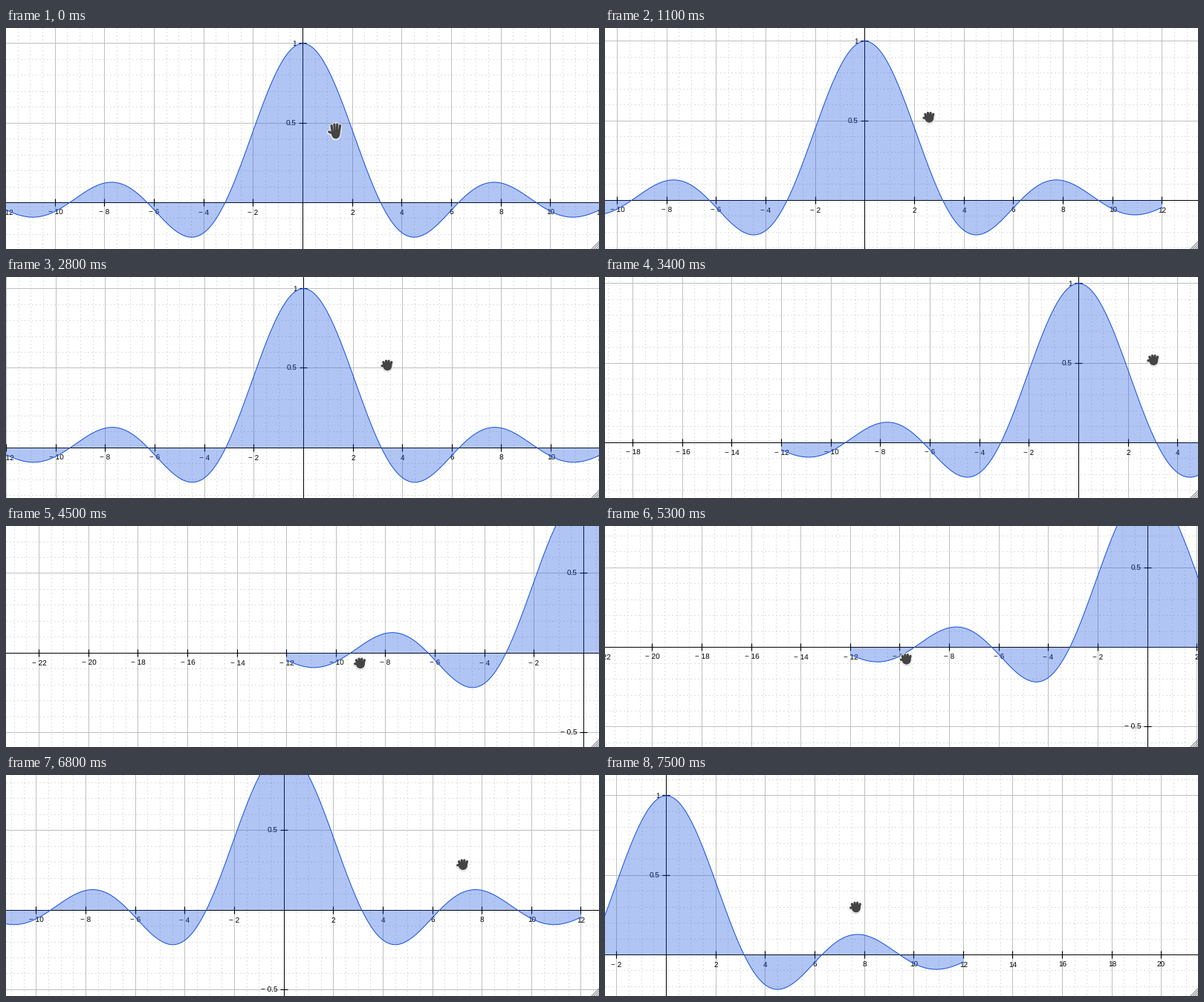
A matplotlib script for the animation above (8000 ms loop, 798 by 298 pixels).

```python
import numpy as np
import matplotlib.pyplot as plt
from matplotlib.animation import FuncAnimation

W, H, DPI = 798, 298, 100
STEP, LOOP = 100, 8000
PX = 72 / DPI                       # one pixel in points
UNIT_X, UNIT_Y = 33.32, 214.6       # pixels per graph unit
BLUE, DARK, MAJOR, MINOR = "#1450e1", "#444444", "#c0c0c0", "#dedede"
LAG = 30                            # the plot trails the hand, in ms

ORIGIN_START, HAND_START, HAND_WAKES = (399.5, 235.5), (443, 139), 200

# Pulls of the plot: start ms, end ms, new origin, downward bend of the path
PULLS = [
    (850, 1700, (161.5, 220.5), 0),
    (2110, 3500, (644.5, 223), 8.5),
    (3800, 4710, (798.3, 163.2), 0),
    (5100, 5800, (454.5, 165.5), 0),
    (6500, 7500, (82.5, 242.5), 0),
]
# The fist holds the plot: grab ms, release ms, hand relative to the origin
GRIPS = [
    (850, 3500, (96.5, -111.5)),
    (3800, 5890, (-306.5, 15.5)),
    (6500, LOOP, (254.5, -64.5)),
]

plt.rcParams["text.hinting"] = "none"
fig = plt.figure(figsize=(W / DPI, H / DPI), dpi=DPI, facecolor="white")
ax = fig.add_axes([0, 0, 1, 1])


def ease(t, t0, t1):
    f = np.clip((t - t0) / (t1 - t0), 0, 1)
    return f * f * (3 - 2 * f)


def origin_at(t):
    pos = np.array(ORIGIN_START)
    for t0, t1, goal, bend in PULLS:
        s = ease(t, t0, t1)
        pos = pos + (goal - pos) * s + (0, bend * np.sin(np.pi * s))
    return pos


def hand_at(t):
    """Position of the hand and whether it is closed."""
    pos, since = np.array(HAND_START), HAND_WAKES
    for grab, release, grip in GRIPS:
        if t < grab:
            goal = origin_at(grab) + grip
            return pos + (goal - pos) * ease(t, since, grab), False
        if t < release:
            return origin_at(t + LAG) + grip, True
        pos, since = origin_at(release) + grip, release
    return pos, False


def crisp(v):
    return np.floor(v) + .5


def line(xs, ys, color, z, width=1.0, **style):
    ax.plot(xs, ys, color=color, lw=width * PX, zorder=z, **style)


def rule(xs, ys, color, z, **style):
    line(xs, ys, color, z, snap=False, solid_capstyle="butt",
         dash_capstyle="butt", **style)


def multiples(origin, gap, size):
    """Index and pixel of each grid step on the stage."""
    first = int((-20 - origin) // gap)
    last = int((size + 20 - origin) // gap)
    return [(k, crisp(origin + k * gap)) for k in range(first, last + 1)]


def grid_style(major):
    if major:
        return dict(color=MAJOR, z=1)
    return dict(color=MINOR, z=0, linestyle=(0, (2, 3)))


def draw_grid(ox, oy):
    for k, x in multiples(ox, UNIT_X / 2, W):
        rule([x, x], [0, H], **grid_style(k % 4 == 0))
    for k, y in multiples(oy, UNIT_Y / 10, H):
        rule([0, W], [y, y], **grid_style(k % 5 == 0))


def label(x, y, value, align):
    sign = "\u2212 " if value < 0 else ""
    ax.text(x, y, f"{sign}{abs(value):g}", ha=align, va="baseline",
            fontsize=10 * PX, family="Liberation Sans", zorder=3, clip_on=True)


def draw_axes(ox, oy):
    x0, y0 = crisp(ox), crisp(oy)
    rule([0, W], [y0, y0], "black", 2)
    rule([x0, x0], [0, H], "black", 2)
    for k, x in multiples(ox, 2 * UNIT_X, W):
        if k:
            rule([x, x], [y0 - 5, y0 + 5], "black", 2, width=1.2)
            label(x, y0 + 16.5, 2 * k, "center")
    for k, y in multiples(oy, UNIT_Y / 2, H):
        if k:
            rule([x0 - 5, x0 + 5], [y, y], "black", 2, width=1.2)
            label(x0 - 9, y + 3.5, -k / 2, "right")


def draw_curve(ox, oy):
    x = np.linspace(-12, 12, 601)
    px, py = ox + x * UNIT_X, oy - UNIT_Y * np.sinc(x / np.pi)
    ax.fill_between(px, py, oy, color=BLUE, alpha=.33, lw=0, zorder=4)
    line(px, py, BLUE, 5)


def draw_hand(x, y, closed):
    reach, spread, palm, radius = (5.8, 3.6, 1.4, 6) if closed else (9.3, 3.9, 5, 5.4)
    x += .8
    # Soft shadow, white outline, then the hand itself
    for z, (color, grow, drop) in enumerate(
            [("#dddddd", 2.4, 1), ("white", 1.6, 0), (DARK, 0, 0)], start=6):
        top, mid = y + drop, y + drop + palm
        ax.add_patch(plt.Circle((x, mid), radius + grow / 2, fc=color, lw=0, zorder=z))
        tips = [(u * spread, .8 * u * u - reach, u * 2.6)
                for u in np.arange(4) - 1.5]
        tips.append((-reach / 2 - 4.4, 1, 0))
        for dx, dy, root in tips:
            line([x + root, x + dx], [mid, top + dy], color, z, 3.3 + grow,
                 solid_capstyle="round")


def draw_grip():
    for d in range(1, 11, 3):
        line([W - d, W], [H, H - d], "#808080", 9)


def draw(frame):
    t = frame * STEP
    ax.clear()
    ax.set(xlim=(0, W), ylim=(H, 0))
    ax.axis("off")
    origin = origin_at(t)
    draw_grid(*origin)
    draw_axes(*origin)
    draw_curve(*origin)
    hand, closed = hand_at(t)
    draw_hand(*hand, closed)
    draw_grip()
    return ()


animation = FuncAnimation(fig, draw, frames=LOOP // STEP, interval=STEP,
                          init_func=lambda: (), repeat=True, repeat_delay=0)
plt.show()
```
